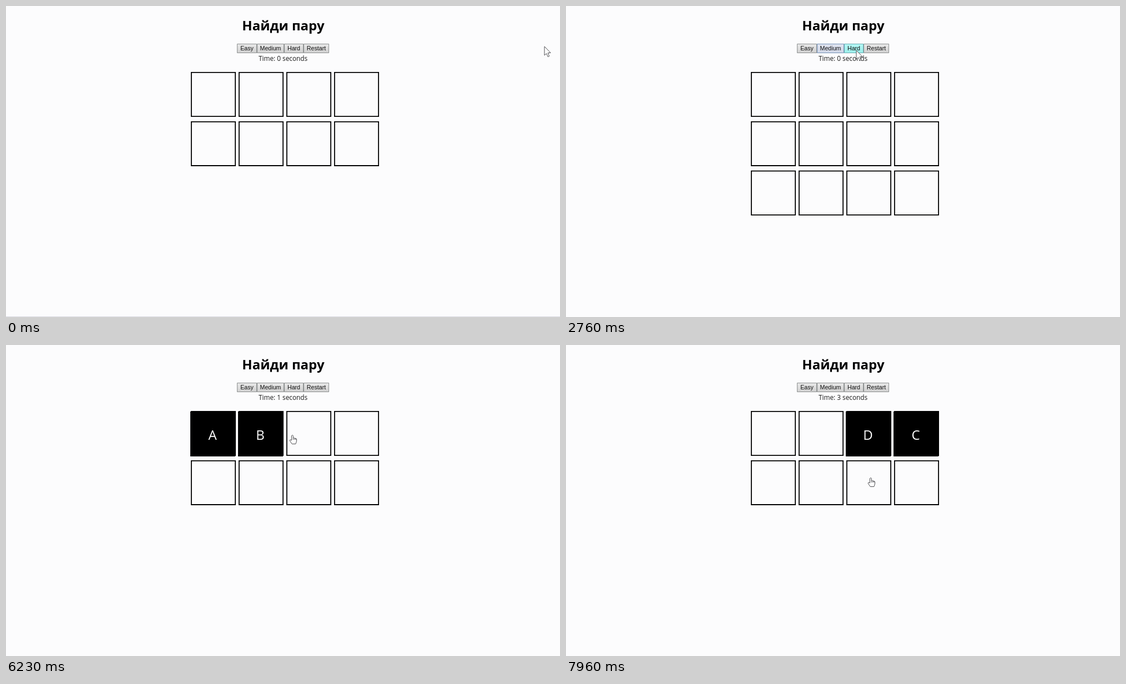
These frames come from a looping animation (998 by 561 pixels, 7.99 s). An HTML page with a canvas:

```html
<!DOCTYPE html>
<html lang="ru">
<head>
<meta charset="utf-8">
<title>Найди пару</title>
<style>
  html, body { margin: 0; width: 100%; height: 100%; overflow: hidden; background: #fcfcfd; }
  canvas { display: block; }
</style>
</head>
<body>
<canvas id="stage" width="998" height="561"></canvas>
<script>
const ctx = document.getElementById('stage').getContext('2d');
const LOOP = 7990;
const SANS = '"Open Sans", "Noto Sans", sans-serif';
const ARIAL = '"Liberation Sans", Arial, sans-serif';

const SIZE = 81, BORDER = 1.8, DEPTH = 800, FLIP = 500;
const GAME_START = 4915;

const buttons = [
  { label: 'Easy', x: 416, w: 36 },
  { label: 'Medium', x: 452, w: 49 },
  { label: 'Hard', x: 501, w: 35 },
  { label: 'Restart', x: 536, w: 46 }
];

// Time from which each row count holds
const levels = [[0, 2], [2270, 3], [3040, 4], [4390, 2]];

// Time from which each button holds the focus
const focus = [[1400, 0], [2240, 1], [3000, 2], [4360, 0], [4920, -1]];

const flips = [
  { card: 0, letter: 'A', open: GAME_START, close: 6480 },
  { card: 1, letter: 'B', open: 5640, close: 6480 },
  { card: 2, letter: 'D', open: 6640, close: Infinity },
  { card: 3, letter: 'C', open: 7330, close: Infinity }
];

// Pointer stops: time, x, y
const path = [
  [30, 970, 73], [790, 402, 96], [830, 402, 96], [1000, 396, 91],
  [1240, 431, 74], [1650, 431, 74], [2030, 478, 75], [2380, 478, 75],
  [2740, 523, 80], [3200, 523, 80], [3680, 556, 78], [3960, 556, 78],
  [4300, 436, 76], [4720, 436, 76], [4900, 392, 158], [5550, 392, 158],
  [5640, 432, 161], [5900, 470, 163], [6200, 516, 162], [6400, 516, 162],
  [6640, 545, 163], [6860, 560, 163], [7170, 643, 162], [7480, 643, 162],
  [7930, 549, 239]
];

const clamp = v => Math.max(0, Math.min(1, v));
const latest = (list, t, start) =>
  list.reduce((value, [from, next]) => t >= from ? next : value, start);

// CSS "ease": cubic-bezier(.25, .1, .25, 1)
function ease(p) {
  if (p <= 0 || p >= 1) return clamp(p);
  const bezier = (a, b, s) => 3 * a * s * (1 - s) ** 2 + 3 * b * s * s * (1 - s) + s ** 3;
  let lo = 0, hi = 1;
  for (let i = 0; i < 24; i++) {
    const mid = (lo + hi) / 2;
    if (bezier(.25, .25, mid) < p) lo = mid; else hi = mid;
  }
  return bezier(.1, 1, lo);
}

function pointerAt(t) {
  const i = path.findIndex(stop => stop[0] > t);
  if (i < 0) return path[path.length - 1].slice(1);
  if (i === 0) return path[0].slice(1);
  const [t0, x0, y0] = path[i - 1], [t1, x1, y1] = path[i];
  const p = (t - t0) / (t1 - t0), s = p * p * (3 - 2 * p);
  return [x0 + (x1 - x0) * s, y0 + (y1 - y0) * s];
}

function text(str, x, y, font, color = '#000') {
  ctx.font = font;
  ctx.fillStyle = color;
  ctx.textAlign = 'center';
  ctx.textBaseline = 'alphabetic';
  ctx.fillText(str, x, y);
}

function drawButton(b, hover, focused) {
  const fill = ctx.createLinearGradient(0, 68, 0, 85);
  const tones = hover ? ['#b5f8f5', '#9ceeea'] : focused ? ['#e0e4f0', '#cfd6e6'] : ['#e9e9e9', '#cfcfcf'];
  tones.forEach((c, i) => fill.addColorStop(i, c));
  ctx.fillStyle = fill;
  ctx.fillRect(b.x, 68, b.w, 17);
  ctx.strokeStyle = hover ? '#69aeb4' : focused ? '#7794b8' : '#8f9292';
  ctx.lineWidth = 1;
  ctx.strokeRect(b.x + .5, 68.5, b.w - 1, 16);
  text(b.label, b.x + b.w / 2, 80, '10.67px ' + ARIAL, '#111');
}

const cardPos = i => [333 + 86 * (i % 4), 119 + 88.9 * Math.floor(i / 4)];

// Traces a square turned about its vertical axis
function traceQuad(cx, cy, half, angle) {
  const corners = [[-half, -half], [half, -half], [half, half], [-half, half]];
  corners.forEach(([x, y], i) => {
    const k = DEPTH / (DEPTH + x * Math.sin(angle));
    ctx[i ? 'lineTo' : 'moveTo'](cx + x * Math.cos(angle) * k, cy + y * k);
  });
  ctx.closePath();
}

function drawCard(i, angle, letter) {
  const [x, y] = cardPos(i), half = SIZE / 2;
  const cx = x + half, cy = y + half;
  ctx.fillStyle = '#000';
  ctx.beginPath();
  traceQuad(cx, cy, half, angle);
  traceQuad(cx, cy, half - BORDER, angle);
  ctx.fill('evenodd');
  if (angle <= Math.PI / 2) return;
  ctx.beginPath();
  traceQuad(cx - 1, cy + 1, half, angle);
  ctx.fill();
  ctx.save();
  ctx.translate(cx - 1.5, cy);
  ctx.scale(-Math.cos(angle), 1);
  text(letter, 0, 11.5, '24px ' + SANS, '#fff');
  ctx.restore();
}

function drawArrow(x, y) {
  const points = [[0, 0], [0, 16], [3.6, 12.7], [6.2, 18.6], [8.7, 17.5], [6.2, 11.7], [11, 11.4]];
  ctx.beginPath();
  points.forEach(([px, py]) => ctx.lineTo(x + px, y + py));
  ctx.closePath();
  paintPointer();
}

function drawHand(x, y) {
  ctx.save();
  ctx.translate(x, y);
  ctx.beginPath();
  ctx.moveTo(-1.6, 10);
  ctx.lineTo(-1.6, 1.6);
  ctx.quadraticCurveTo(0, -.6, 1.3, 1.6);
  ctx.lineTo(1.3, 6);
  ctx.quadraticCurveTo(2.8, 4.6, 3.8, 6.3);
  ctx.quadraticCurveTo(5.2, 5.4, 6, 7.1);
  ctx.quadraticCurveTo(7.6, 6.8, 7.6, 8.5);
  ctx.lineTo(7.3, 12);
  ctx.lineTo(5.8, 16.5);
  ctx.lineTo(-.8, 16.5);
  ctx.lineTo(-4.8, 10.5);
  ctx.quadraticCurveTo(-4.6, 8.2, -2.9, 9.2);
  ctx.closePath();
  paintPointer();
  ctx.beginPath();
  for (const kx of [1.3, 3.8, 6]) {
    ctx.moveTo(kx, 6.2);
    ctx.lineTo(kx, 9);
  }
  ctx.stroke();
  ctx.restore();
}

function paintPointer() {
  ctx.fillStyle = '#fff';
  ctx.strokeStyle = '#3c3c40';
  ctx.lineWidth = .9;
  ctx.lineJoin = 'round';
  ctx.fill();
  ctx.stroke();
}

function render(t) {
  ctx.fillStyle = '#fcfcfd';
  ctx.fillRect(0, 0, 998, 561);
  if (t < 30) {
    ctx.fillStyle = '#d8d8e0';
    ctx.fillRect(0, 560, 998, 1);
  }

  const [px, py] = pointerAt(t);
  text('Найди пару', 499.5, 43.5, 'bold 24px ' + SANS);

  const focused = latest(focus, t, -1);
  buttons.forEach((b, i) => {
    const hover = px >= b.x && px < b.x + b.w && py >= 68 && py < 85;
    drawButton(b, hover, i === focused);
  });

  const seconds = Math.max(0, Math.floor((t - GAME_START) / 1000));
  text(`Time: ${seconds} seconds`, 499, 98.5, '11.8px ' + SANS, '#1a1a1a');

  let overCard = false;
  const count = 4 * latest(levels, t, 2);
  for (let i = 0; i < count; i++) {
    const flip = flips.find(f => f.card === i);
    const turn = flip ? ease((t - flip.open) / FLIP) - ease((t - flip.close) / FLIP) : 0;
    drawCard(i, turn * Math.PI, flip && flip.letter);
    const [x, y] = cardPos(i);
    overCard = overCard || (px >= x && px <= x + SIZE && py >= y && py <= y + SIZE);
  }

  (overCard ? drawHand : drawArrow)(px, py);
}

const start = performance.now();
function tick() {
  render((performance.now() - start) % LOOP);
  requestAnimationFrame(tick);
}
tick();
</script>
</body>
</html>
```
